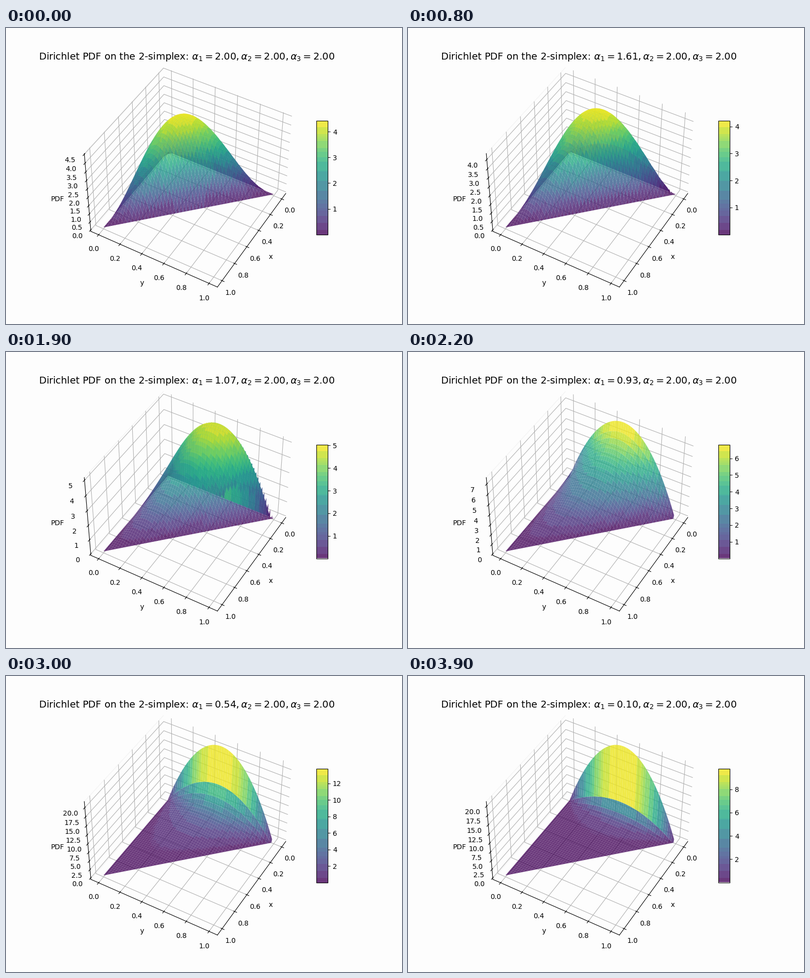
Write a matplotlib script that moves like this. It is 800 by 600 pixels and loops after 4 s.

```python
import matplotlib.pyplot as plt
import numpy as np
from matplotlib.animation import FuncAnimation
from matplotlib.colors import ListedColormap

FRAMES = 40
N = 200
BG = "#fdfdfd"
OPACITY = 0.8

plt.rcParams.update({
    "figure.facecolor": BG,
    "axes.facecolor": BG,
    "axes3d.xaxis.panecolor": BG,
    "axes3d.yaxis.panecolor": BG,
    "axes3d.zaxis.panecolor": BG,
})

alphas = np.linspace(2.0, 0.1, FRAMES)
step = np.arange(N)
I, J = np.meshgrid(step, step)
X, Y = I / (N - 1), J / (N - 1)
third = (N - 1 - I - J) / (N - 1)
third = np.where(third < 0, np.nan, third)


def banded_viridis():
    """Viridis in flat bands, split where a blended channel crosses a step."""
    base = plt.get_cmap("viridis")(np.arange(256))[:, :3]
    shown = np.floor(255 * (OPACITY * base + 1 - OPACITY)).astype(int)
    cells = shown // np.array([32, 16, 32])
    bands = np.zeros_like(base)
    for cell in np.unique(cells, axis=0):
        inside = (cells == cell).all(axis=1)
        bands[inside] = base[inside].mean(axis=0)
    return ListedColormap(bands)


def density(a):
    """Dirichlet density for (a, 2, 2); undefined points become NaN."""
    scale = a * (a + 1) * (a + 2) * (a + 3)
    with np.errstate(divide="ignore", invalid="ignore"):
        z = scale * X ** (a - 1) * Y * third
    return np.where(np.isfinite(z), z, np.nan)


cmap = banded_viridis()
fig = plt.figure(figsize=(8, 6), dpi=100)


def draw(frame):
    a = alphas[frame]
    fig.clear()
    ax = fig.add_subplot(111, projection="3d")
    surface = ax.plot_surface(X, Y, density(a), cmap=cmap,
                              edgecolor="none", alpha=OPACITY)
    ax.view_init(elev=45, azim=30)
    for axis in (ax.yaxis, ax.zaxis):
        axis.pane.set_edgecolor("#f4f4f4")
    ax.set_xlabel("x")
    ax.set_ylabel("y")
    ax.set_zlabel("PDF")
    ax.set_title("Dirichlet PDF on the 2-simplex: "
                 rf"$\alpha_1={a:.2f}, \alpha_2=2.00, \alpha_3=2.00$",
                 fontsize=14)
    fig.colorbar(surface, ax=ax, shrink=0.5, aspect=10)
    return []


anim = FuncAnimation(fig, draw, frames=FRAMES, interval=100,
                     init_func=lambda: [], repeat=True, repeat_delay=0)
plt.show()
```
